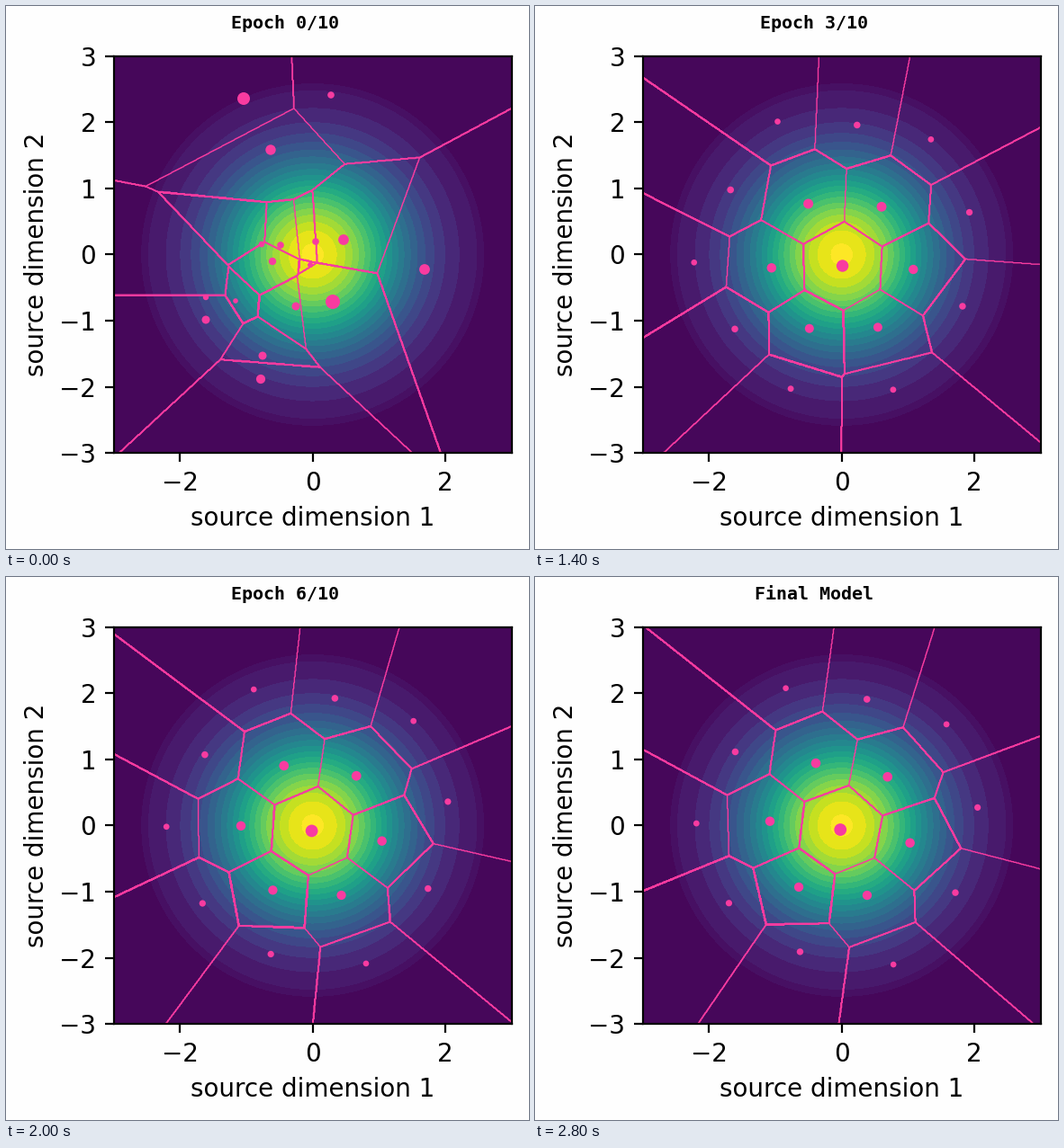
Recreate the animation shown at these times as a matplotlib script. Size 581 by 604 pixels, loop 4.8 s.

```python
import numpy as np
import matplotlib.pyplot as plt
from matplotlib.animation import FuncAnimation

WIDTH, HEIGHT, DPI = 581, 604, 200
LEFT, RIGHT, TOP, BOTTOM = 119.7, 561.6, 55.55, 497.4
LIMIT = 3
PINK = "#f83ba0"
FRAME_MS = 200
EPOCHS = 10
RATE_WEIGHT = 0.2

# Untrained codebook: x, y and dot radius in stage pixels.
# The rows become the outer ring, the inner ring and the centre after training.
START = np.array([
    (375, 260, 5.9), (361, 99, 3.8), (294, 160, 5.7), (264, 103, 7), (284, 265, 3.3),
    (222, 324, 3.2), (285, 389, 4.5), (222, 349, 4.5), (283, 415, 5.1), (465, 293, 5.9),
    (338, 288, 3), (344, 262, 3.8), (305, 266, 3.8), (296, 284, 4.2), (255, 328, 2.8),
    (322, 334, 4.5),
    (363, 329, 8)])
# Codebook order; borders between consecutive entries come out thinner.
ORDER = [14, 3, 2, 1, 5, 13, 0, 9, 12, 11, 8, 4, 16, 15, 7, 10, 6]


def cos(degrees):
    return np.cos(np.radians(degrees))


def sin(degrees):
    return np.sin(np.radians(degrees))


def polar(radius, angle):
    return np.column_stack([radius * cos(angle), radius * sin(angle)])


def start_layout():
    x, y, radii = START.T
    points = np.column_stack([
        (x - LEFT) / (RIGHT - LEFT) * 2 * LIMIT - LIMIT,
        LIMIT - (y - TOP) / (BOTTOM - TOP) * 2 * LIMIT])
    return points, radii


def trained_layout(epoch):
    """Two slightly uneven rings that untwist while a gap at lower right closes."""
    relax = 0.57 ** (epoch - 1)
    twist = 13.5 * (1 - (epoch - 1) / (EPOCHS - 1)) ** 2
    centre = np.array([-0.02 + 0.1 * relax, -0.06 - 0.34 * relax])

    phase = twist - 8.8
    inner = 60 * np.arange(6) + phase
    inner += 3 * cos(inner - 220)

    outer = 36 * np.arange(10) + 7
    outer = outer - 3.7 + 4.7 * cos(outer - 35)
    from_gap = outer - 311
    outer += twist / 2 + relax * (14 * sin(from_gap) + 10 * sin(2 * from_gap))
    reach = 2.09 + 0.15 * cos(6 * (outer - phase))

    points = np.vstack([polar(reach, outer), centre + polar(1.07, inner), centre])
    return points, 7 - 1.65 * np.hypot(*points.T)


fig = plt.figure(figsize=(WIDTH / DPI, HEIGHT / DPI), dpi=DPI, facecolor="#fefefe")
ax = fig.add_axes([LEFT / WIDTH, 1 - BOTTOM / HEIGHT,
                   (RIGHT - LEFT) / WIDTH, (BOTTOM - TOP) / HEIGHT])
ax.set_xlim(-LIMIT, LIMIT)
ax.set_ylim(-LIMIT, LIMIT)
ax.set_xticks([-2, 0, 2])
ax.set_yticks(range(-LIMIT, LIMIT + 1))
ax.set_xlabel("source dimension 1")
ax.set_ylabel("source dimension 2")

axis = np.linspace(-LIMIT, LIMIT, 601)
X, Y = np.meshgrid(axis, axis)

# Banded Gaussian density.
levels = np.concatenate([[0, 0.036, 0.047], 0.0875 + 0.05 * np.arange(19), [1.01]])
bands = plt.get_cmap("viridis")((levels[:-1] + levels[1:]) / 2)
ax.contourf(X, Y, np.exp(-(X**2 + Y**2) / 2), levels, colors=bands, antialiased=False)


def draw_epoch(epoch):
    """Cells of the entropy-constrained quantizer and its codebook vectors."""
    points, radii = trained_layout(epoch) if epoch else start_layout()
    points, radii = points[ORDER], radii[ORDER]
    costs = [(X - x)**2 + (Y - y)**2 - 2 * RATE_WEIGHT * np.log(r)
             for (x, y), r in zip(points, radii)]
    cells = np.argmin(costs, axis=0)
    borders = ax.contour(X, Y, cells, np.arange(len(points) - 1) + 0.5,
                         colors=PINK, linewidths=0.5)
    dots = ax.scatter(*points.T, s=(2 * radii * 72 / DPI)**2, color=PINK,
                      linewidths=0, zorder=3)
    return borders, dots


scenes = [draw_epoch(epoch) for epoch in range(EPOCHS + 1)]
title = fig.text(310 / WIDTH, 1 - 25 / HEIGHT, "", ha="center", va="baseline",
                 family="DejaVu Sans Mono", weight="bold", size=7.2)


def update(frame):
    current = min(max(frame - 4, 0), EPOCHS)
    for epoch, scene in enumerate(scenes):
        for artist in scene:
            artist.set_visible(epoch == current)
    title.set_text("Final Model" if current == EPOCHS else f"Epoch {current}/{EPOCHS}")
    return [title]


anim = FuncAnimation(fig, update, frames=24, interval=FRAME_MS, repeat=True,
                     repeat_delay=0)
plt.show()
```
